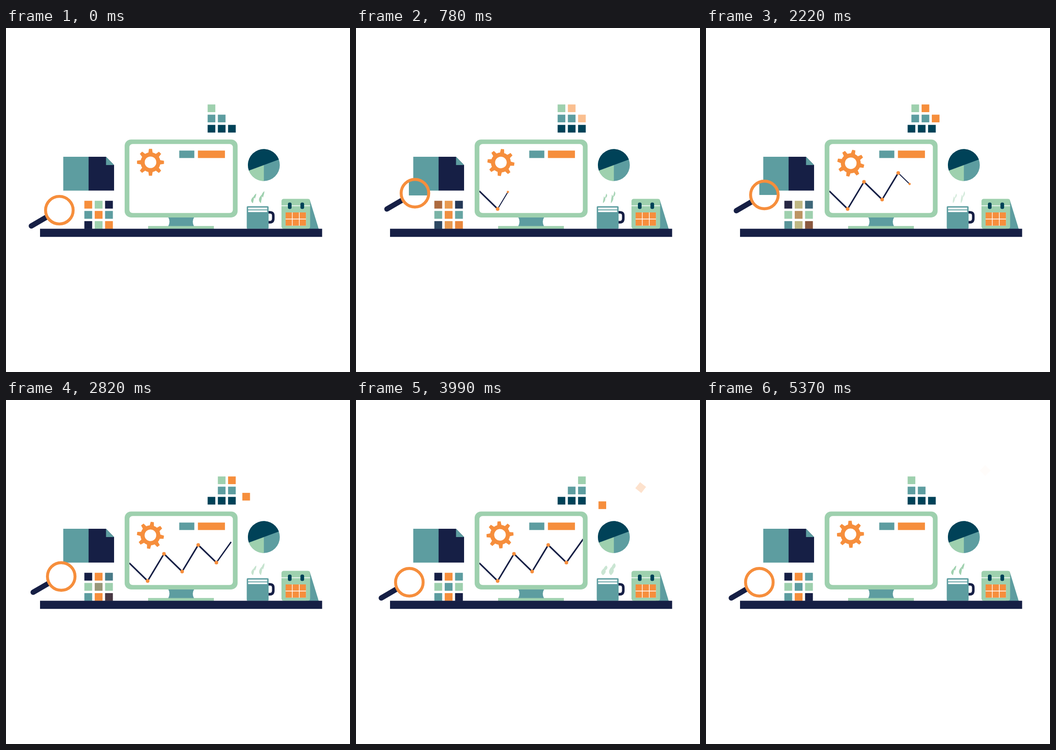
Recreate the animation shown at these times as an HTML page. Size 748 px wide and 748 px high, loop 5.4 s.

```html
<!DOCTYPE html>
<html lang="en">
<head>
<meta charset="utf-8">
<title>Desk</title>
<style>
  html, body { margin: 0; width: 100%; height: 100%; overflow: hidden; background: #fff; }
  svg { display: block; width: 100vw; height: 100vh; }
  .o { fill: #f68e3c } .g { fill: #9ed0ae } .t { fill: #5d9da0 }
  .n { fill: #161f45 } .d { fill: #004258 } .w { fill: #fff }
</style>
</head>
<body>
<svg viewBox="0 0 748 748">
  <defs>
    <clipPath id="screen"><rect x="268.3" y="252.3" width="225" height="150" rx="7"/></clipPath>
    <clipPath id="lens"><circle id="lensHole" r="30"/></clipPath>
    <g id="doc">
      <rect class="t" x="124.5" y="280" width="55.5" height="73.6"/>
      <path class="n" d="M179.6 280H217.5L235 298V353.6H179.6Z"/>
      <path class="t" d="M217.5 280L235 298H217.5Z"/>
    </g>
  </defs>

  <use href="#doc"/>
  <g id="grid"></g>

  <!-- monitor -->
  <path class="t" d="M352.5 411H409.5Q403 421 409 431.5H352.5Q358.5 421 352.5 411Z"/>
  <rect class="g" x="309" y="430.6" width="143" height="6.4"/>
  <rect class="g" x="258" y="242.5" width="245.6" height="169.4" rx="14"/>
  <rect class="w" x="268.3" y="252.3" width="225" height="150" rx="7"/>
  <rect class="t" x="376.7" y="266.5" width="32.8" height="16.2"/>
  <rect class="o" x="417.3" y="266.5" width="58.8" height="16.2"/>
  <g clip-path="url(#screen)"><g id="chart"></g></g>
  <g id="gear"></g>

  <!-- pie -->
  <circle class="t" cx="560.7" cy="298" r="34.7"/>
  <path class="g" d="M560.7 298V332.7A34.7 34.7 0 0 1 528.1 310Z"/>
  <path class="d" d="M528.1 310A34.7 34.7 0 0 1 593.3 286Z"/>

  <!-- mug -->
  <path d="M570 400.8H574Q581.2 400.8 581.2 408V414Q581.2 422.4 574 422.4H570" fill="none" stroke="#161f45" stroke-width="5.6"/>
  <rect class="t" x="523.5" y="387.5" width="47.5" height="49.3" rx="2"/>
  <path class="w" d="M526.5 390.4H568V394.6H526.5ZM526.5 396.6H568V400.2H526.5Z"/>
  <g id="steam" class="g"></g>

  <!-- calendar -->
  <path class="t" d="M658 373.5H660.5L680 437H652Z"/>
  <rect class="g" x="599" y="371.4" width="62.3" height="65.4" rx="5"/>
  <rect class="w" x="599" y="385.7" width="62.3" height="1.6"/>
  <rect class="d" x="613" y="379.6" width="8" height="14" rx="3.6"/>
  <rect class="d" x="640.2" y="379.6" width="8" height="14" rx="3.6"/>
  <rect class="w" x="608" y="401" width="44.2" height="28.8"/>
  <g id="days"></g>

  <rect class="n" x="74" y="436.5" width="613.4" height="17.7"/>
  <g id="pile"></g>

  <!-- magnifier -->
  <g id="glass">
    <path d="M55 430.5L88 411.3" stroke="#161f45" stroke-width="11.5" stroke-linecap="round"/>
    <circle class="w" cx="116" cy="396.2" r="30"/>
  </g>
  <g clip-path="url(#lens)"><use id="zoomed" href="#doc"/></g>
  <circle id="rim" cx="116" cy="396.2" r="30" fill="none" stroke="#f68e3c" stroke-width="6.4"/>
</svg>

<script>
const LOOP = 5400;
const RGB = { O: [246, 142, 60], G: [158, 208, 174], N: [22, 31, 69], T: [93, 157, 160] };
const $ = id => document.getElementById(id);
const set = (el, attrs) => { for (const k in attrs) el.setAttribute(k, attrs[k]); return el; };
const add = (parent, tag, attrs) =>
  parent.appendChild(set(document.createElementNS('http://www.w3.org/2000/svg', tag), attrs));
const mix = (a, b, p) => a + (b - a) * p;
const part = (t, from, to) => Math.max(0, Math.min(1, (t - from) / (to - from)));

// Linear motion through keys of the form [time, ...values]
function at(keys, t) {
  const i = Math.max(1, keys.findIndex(k => k[0] > t));
  const [a, b] = t < keys.at(-1)[0] ? [keys[i - 1], keys[i]] : [keys.at(-1), keys.at(-1)];
  const p = a === b ? 0 : part(t, a[0], b[0]);
  return a.slice(1).map((v, j) => mix(v, b[j + 1], p));
}

// Colour grid: start and end colour, duration, easing
const steady = p => p;
const late = p => p * p;
const bounce = p => 1 - Math.abs(1 - p * 3 % 2);
const cells = [
  ['ON', 2400, steady], ['GO', 2800, bounce], ['NT', 3900, steady],
  ['TG', 1800, steady], ['OT', 3600, late], ['TG', 2150, late],
  ['NT', 2400, steady], ['GO', 2800, bounce], ['ON', 3200, late]
].map(([pair, span, ease], i) => ({
  from: RGB[pair[0]], to: RGB[pair[1]], span, ease,
  el: add($('grid'), 'rect', {
    x: 170.4 + i % 3 * 22.5, y: 375.7 + Math.floor(i / 3) * 22.1, width: 17, height: 17
  })
}));

for (let i = 0; i < 6; i++) {
  add($('days'), 'rect', {
    class: 'o', x: 608 + i % 3 * 15.2, y: 401 + Math.floor(i / 3) * 15.2, width: 13.8, height: 13.6
  });
}

for (let i = 0; i < 8; i++) {
  add($('gear'), 'path', { class: 'o', d: 'M-4.9-19L-3.4-29.3H3.4L4.9-19Z', transform: `rotate(${i * 45})` });
}
add($('gear'), 'circle', { class: 'o', r: 21.7 });
add($('gear'), 'circle', { class: 'w', r: 12.6 });

// Chart: every segment grows out of the point before it
const points = [[268, 354.5], [308, 393.5], [343.5, 334.5], [383, 373], [418, 315.2], [457.5, 353.5], [494, 302.4]];
const segments = points.slice(1).map(([x, y], i) => {
  const dx = x - points[i][0], dy = y - points[i][1];
  const el = add($('chart'), 'g', {});
  $('chart').prepend(el);
  add(el, 'path', { d: `M0 0L${dx} ${dy}`, stroke: '#161f45', 'stroke-width': 3.3 });
  add(el, 'circle', { class: 'o', cx: dx, cy: dy, r: i < 5 ? 3.9 : 0 });
  return el;
});

// Block pile: two pushes move the rows, loose blocks drop on the pie and bounce off
const SIDE = 16.7, COL = 446.8, STEP = 22.2, ROW = 174.6;
const square = cls =>
  add($('pile'), 'rect', { class: cls, x: -SIDE / 2, y: -SIDE / 2, width: SIDE, height: SIDE });
const place = (el, x, y, r = 0) => set(el, { transform: `translate(${x} ${y}) rotate(${r})` });
for (let i = 0; i < 3; i++) place(square('d'), COL + i * STEP, ROW + 2 * STEP);
const top1 = square('g'), mid = [square('t'), square('t')];
const push = (t, start) => part(t, start, start + 600);
const PUSHES = [2000, 3114];
const loose = [
  { col: 2, row: 1, edge: 2600, land: [3540, 551, 254], gone: [4150, 643, 168] },
  { col: 1, row: 0, edge: 3714, land: [4120, 546, 254], gone: [5400, 608.5, 151] }
].map(b => ({ ...b, el: square('o') }));

function drawPile(t) {
  const [first, second] = PUSHES.map(start => push(t, start));
  const stay = 1 - part(t, 4620, 5100);
  place(top1, COL + STEP * (first + second) * stay, ROW);
  mid.forEach((el, i) => place(el, COL + STEP * (i + first * stay), ROW + STEP));
  for (const b of loose) {
    const y = ROW + STEP * b.row;
    const pushed = COL + STEP * (b.col + first + second);
    const fall = [[b.edge, COL + STEP * 3, y], b.land, b.gone];
    const out = part(t, b.land[0], b.gone[0]);
    place(b.el, ...(t < b.edge ? [pushed, y] : at(fall, t)), 45 * Math.sqrt(out));
    set(b.el, { opacity: part(t, 240, 1200) * (1 - out) });
  }
}

// Steam: leaves between two tips, whose left and right sides swell in turn
const wisps = ['translate(533 360)', 'translate(550 354.8) scale(1.06 1.25)']
  .map(transform => add($('steam'), 'path', { transform }));
const steamAlpha = [[0, 1], [780, .9], [1560, .32], [3540, .75], [4500, .3], [5400, 1]];
function leaf(x, y, dx, dy, left, right) {
  const y1 = y + dy * .35, y2 = y + dy * .7, end = x + dx;
  return `M${x} ${y}C${x - left} ${y1} ${end - left} ${y2} ${end} ${y + dy}` +
    `C${end + right} ${y2} ${x + right} ${y1} ${x} ${y}Z`;
}
function drawSteam(t) {
  const turn = t / LOOP * 4 * Math.PI;
  const left = 5 * Math.cos(turn) ** 2, right = .5 + 4.5 * Math.abs(Math.sin(turn / 2));
  const d = leaf(11, 0, -2.5, 11, left, right) + leaf(6, 6, -2, 15, left * 1.3, right * 1.3);
  wisps.forEach(el => set(el, { d }));
  set($('steam'), { opacity: at(steamAlpha, t)[0] });
}

function drawGlass(t) {
  const p = part(t, 0, 925) - part(t, 1920, 3180);
  const x = 14.4 * p, y = -43.7 * p;
  const move = { transform: `translate(${x} ${y})` };
  set($('glass'), move);
  set($('rim'), move);
  set($('lensHole'), { cx: 116 + x, cy: 396.2 + y });
  set($('zoomed'), { transform: `translate(${-11.3 * p} ${12.4 * p})` });
}

function draw(t) {
  for (const c of cells) {
    const p = c.ease(part(t, 0, c.span));
    set(c.el, { fill: `rgb(${c.from.map((v, i) => Math.round(mix(v, c.to[i], p)))})` });
  }
  set($('gear'), { transform: `rotate(${t / LOOP * 360} 314.2 293.1) translate(314.2 292)` });
  segments.forEach((el, i) => {
    const p = part(t, i * 480, i * 480 + 480);
    set(el, { transform: `translate(${points[i]}) scale(${p})`, visibility: p ? 'visible' : 'hidden' });
  });
  set($('chart'), { opacity: 1 - part(t, 4620, 5100) });
  drawPile(t);
  drawGlass(t);
  drawSteam(t);
}

const start = performance.now();
function tick() {
  draw((performance.now() - start) % LOOP);
  requestAnimationFrame(tick);
}
draw(0);
requestAnimationFrame(tick);
</script>
</body>
</html>
```
